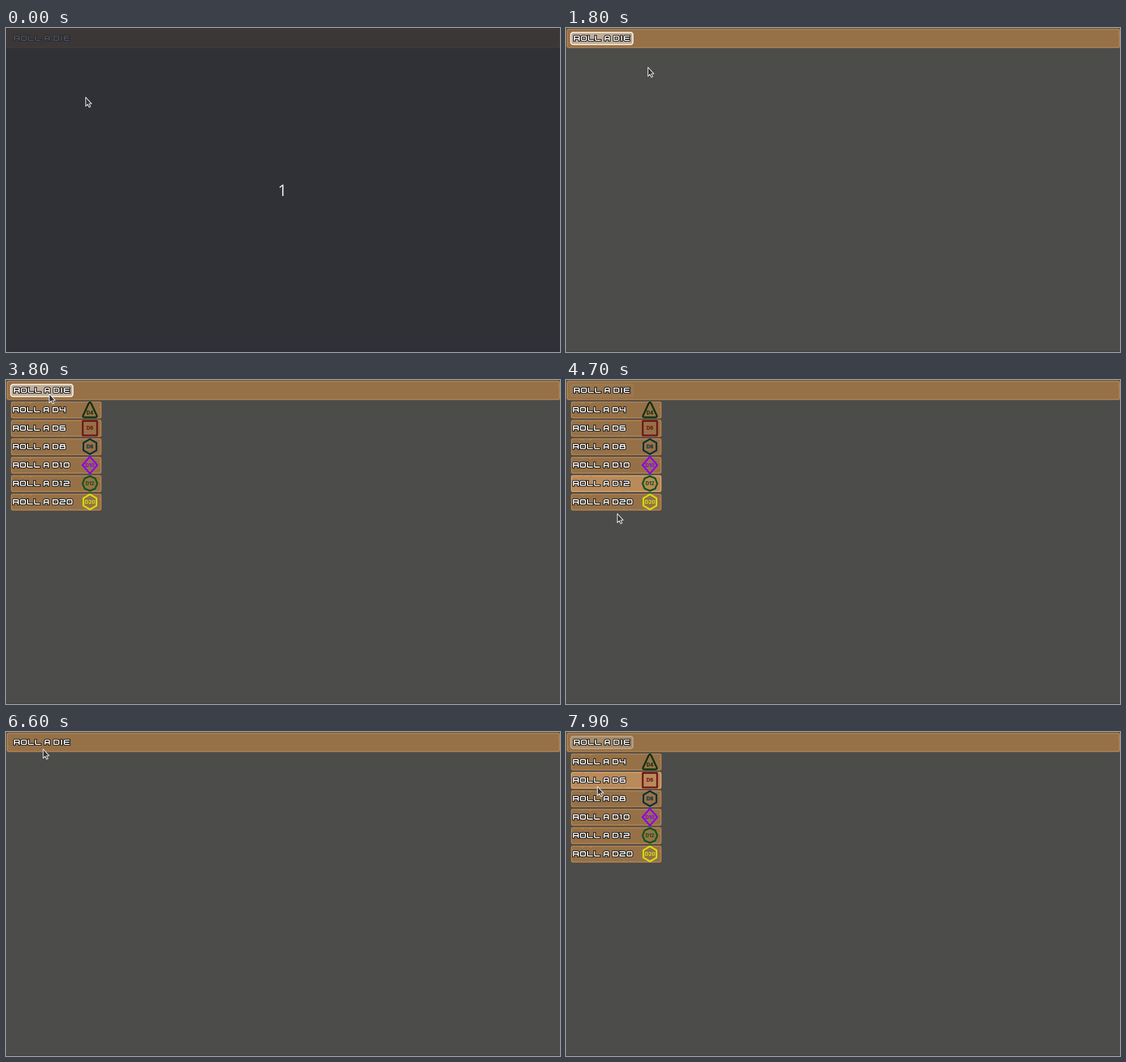
These frames come from a looping animation (977x573 px, 8 s). An HTML page:

```html
<!DOCTYPE html>
<html lang="en">
<head>
<meta charset="utf-8">
<title>Roll a die</title>
<style>
html, body { margin: 0; width: 100%; height: 100%; overflow: hidden; background: #4c4c4a; }
svg { display: block; width: 977px; height: 573px; }
.badge { font: 800 8.6px Inter, sans-serif; text-anchor: middle; }
.count { font: 28px "Noto Sans", sans-serif; text-anchor: middle; }
</style>
</head>
<body>
<svg id="stage" viewBox="0 0 977 573" xmlns="http://www.w3.org/2000/svg"></svg>
<script>
const NS = "http://www.w3.org/2000/svg";
const stage = document.getElementById("stage");
const LOOP = 8000, STEP = 100, PITCH = 32.6;
const WOOD = "#967147", EDGE = "#b28558", WOOD_LIT = "#b98a5a", EDGE_LIT = "#d6a774";

function add(parent, tag, attrs, text) {
  const el = document.createElementNS(NS, tag);
  for (const k in attrs) el.setAttribute(k, attrs[k]);
  if (text) el.textContent = text;
  parent.appendChild(el);
  return el;
}

// Square lettering: centre lines in an 8.5 x 7.5 box
const RING = "M1 0H7.5L8.5 1V6.5L7.5 7.5H1L0 6.5V1Z";
const GLYPHS = {
  R: "M0 7.5V0H7.5L8.5 1V4.2H0M6.5 4.2L8.5 6V7.5",
  O: RING,
  L: "M0 0V6.5L1 7.5H8.5",
  A: "M0 7.5V1.5L1.5 0H6.5L7.5 1V7.5M0 4.6H7.5",
  D: "M0 0H7L8.5 1.5V6L7 7.5H0Z",
  I: "M.8 0V7.5",
  E: "M8.5 0H1L0 1V6.5L1 7.5H8.5M0 3.7H7.8",
  0: RING,
  1: "M0 0H2V7.5",
  2: "M0 0H7.5L8.5 1V3.7H1L0 4.7V7.5H8.5",
  4: "M0 0V4.2H8.5M8.5 0V7.5",
  6: "M8 0H1L0 1V6.5L1 7.5H8.5V3.5H0",
  8: "M1 0H7.5V3.5H8.5V7.5H0V3.5H1ZM1 3.5H7.5"
};
const ADVANCE = { " ": 4.4, A: 11.4, I: 5.8, 1: 7.2 };

function lettering(parent, str, x, y) {
  const g = add(parent, "g", { fill: "none", "stroke-linecap": "square", role: "img", "aria-label": str });
  const back = add(g, "g", { stroke: "#101010", "stroke-width": 4.4, "stroke-linejoin": "round" });
  const front = add(g, "g", { stroke: "#fff", "stroke-width": 1.9 });
  for (const c of str) {
    if (GLYPHS[c]) for (const layer of [back, front])
      add(layer, "path", { d: GLYPHS[c], transform: `translate(${x} ${y})` });
    x += ADVANCE[c] || 12.4;
  }
}

function panel(parent, x, y, w, h) {
  add(parent, "rect", { x, y, width: w, height: h, rx: 4, fill: "#6d553b" });
  return add(parent, "rect", {
    x: x + 1.6, y: y + 1.6, width: w - 3.2, height: h - 3.2, rx: 2.5,
    fill: WOOD, stroke: EDGE, "stroke-width": 1.7
  });
}

const grain = (parent, d) => add(parent, "path", { d, fill: "none", stroke: EDGE, "stroke-width": 1.3 });

// Regular polygon standing on a corner
function polygon(n, r) {
  let d = "";
  for (let i = 0; i < n; i++) {
    const a = i * 2 * Math.PI / n;
    d += `${i ? "L" : "M"}${r * Math.sin(a)} ${-r * Math.cos(a)}`;
  }
  return d + "Z";
}

add(stage, "rect", { width: 977, height: 573, fill: "#4c4c4a" });
add(stage, "rect", { y: 571, width: 977, height: 2, opacity: 0.1 });

panel(stage, 0.6, 0.7, 977, 35.4);
grain(stage, "M974 10.5h3M2 26.5h3");
const button = add(stage, "rect", {
  x: 8.4, y: 7.7, width: 109.6, height: 21.6, rx: 4,
  fill: "#fff", "fill-opacity": 0.42, stroke: "#f7f0e6", "stroke-width": 2
});
lettering(stage, "ROLL A DIE", 14.9, 14.4);

const DICE = [
  { name: "D4", color: "#0a3210", drop: 5.6,
    d: "M-2 -11.6Q0 -14.4 2 -11.6L12.2 10.6Q13 13.4 10.4 13.4H-10.4Q-13 13.4 -12.2 10.6Z" },
  { name: "D6", color: "#701517", d: "M-12.7 -12.7H12.7V12.7H-12.7Z" },
  { name: "D8", color: "#0b303b", d: polygon(6, 13.3) },
  { name: "D10", color: "#8c00ec", d: "M0 -15L13 0L0 15L-13 0Z" },
  { name: "D12", color: "#125519", d: polygon(8, 13) },
  { name: "D20", color: "#d0dc10", d: polygon(6, 13.3) }
];
const menu = add(stage, "g", {});
const rows = DICE.map(({ name, color, d, drop = 0 }, i) => {
  const row = add(menu, "g", { transform: `translate(0 ${i * PITCH})` });
  const face = panel(row, 8.2, 37.4, 160.8, 31);
  grain(row, "M27 40.5h3l2-1M41 40.5h3l2-1M100 65.8h4M165.5 46v3");
  lettering(row, "ROLL A " + name, 13.2, 48.7);
  const icon = add(row, "g", { transform: "translate(148 52.6)" });
  add(icon, "path", { d, fill: "none", stroke: color, "stroke-width": 3, "stroke-linejoin": "round" });
  add(icon, "text", { class: "badge", y: 3.1 + drop, fill: color }, name);
  return face;
});

const splash = add(stage, "g", {});
add(splash, "rect", { width: 977, height: 573, fill: "#292b34", opacity: 0.82 });
add(splash, "text", { class: "count", x: 487.5, y: 297, fill: "#dfe3e6" }, "1");

const cursor = add(stage, "path", {
  d: "M.5 .4V16.4L4 13L6.5 18.2L9 17L6.6 12H11Z",
  fill: "#343536", stroke: "#f2f2f2", "stroke-width": 1.2, "stroke-linejoin": "round"
});

// Pointer stops: time, x, y
const STOPS = [
  [600, 140, 122], [1200, 76, 20], [1500, 88, 18], [1800, 144, 69], [1900, 150, 73],
  [2600, 78, 24], [4200, 75, 24], [4700, 90, 236], [5400, 96, 64], [5900, 257, 150],
  [6100, 257, 150], [6600, 65, 30], [6800, 62, 20], [7200, 62, 20], [7500, 60, 200], [7800, 55, 96]
];
// Spans when the pointer keeps the button lit, and when the menu is open
const LIT = [[1000, 1800], [2500, 4300], [6600, 7650]];
const OPEN = [[3700, 6100], [7100, LOOP]];
const FADE_IN = 200, FADE_OUT = 430;

const clamp = v => Math.min(1, Math.max(0, v));

function pointer(t) {
  const j = Math.max(1, STOPS.findIndex(s => s[0] > t));
  const last = STOPS[STOPS.length - 1];
  const [a, b] = t >= last[0] ? [last, last] : [STOPS[j - 1], STOPS[j]];
  const p = clamp((t - a[0]) / (b[0] - a[0] || 1));
  return [1, 2].map(k => a[k] + (b[k] - a[k]) * p);
}

const glow = t => Math.max(...LIT.map(([from, to]) =>
  Math.min(clamp((t - from) / FADE_IN), clamp(1 - (t - to) / FADE_OUT))));

function hoveredRow(t) {
  const [x, y] = pointer(t - STEP); // highlight trails the pointer by a step
  return x > 8 && x < 169 ? Math.floor((y - 37) / PITCH) : -1;
}

const show = (el, on) => { el.style.display = on ? "" : "none"; };

function draw(now) {
  const t = Math.floor((now % LOOP) / STEP) * STEP;
  const over = hoveredRow(t);
  show(splash, t < STEP);
  show(menu, OPEN.some(([from, to]) => t >= from && t < to));
  button.setAttribute("opacity", glow(t));
  rows.forEach((face, i) => {
    face.setAttribute("fill", i === over ? WOOD_LIT : WOOD);
    face.setAttribute("stroke", i === over ? EDGE_LIT : EDGE);
  });
  cursor.setAttribute("transform", `translate(${pointer(t)})`);
}

let start;
function tick(now) {
  start ??= now;
  draw(now - start);
  requestAnimationFrame(tick);
}
draw(0);
requestAnimationFrame(tick);
</script>
</body>
</html>
```
